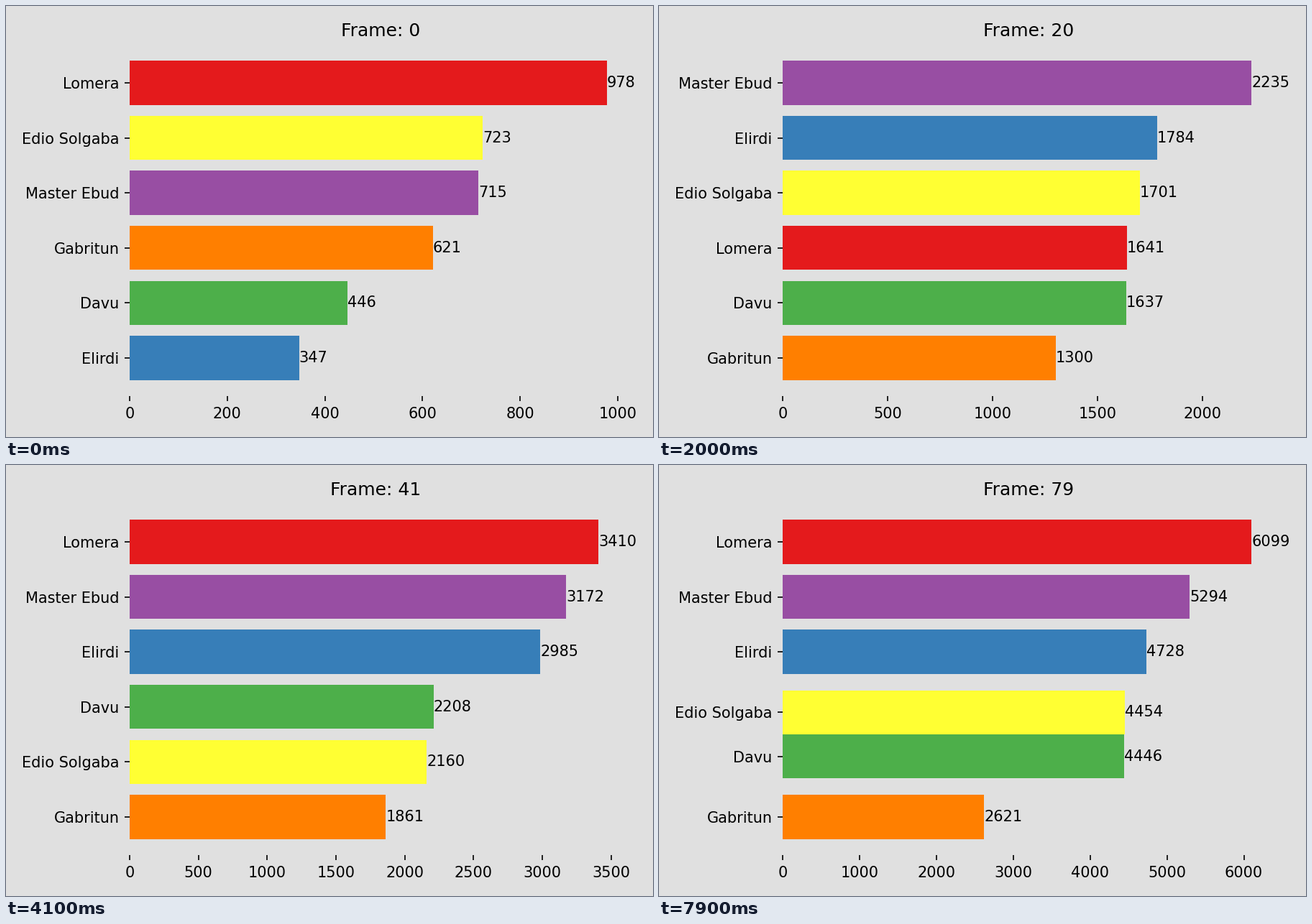
Animation, 900 px wide and 600 px high, one loop 8000 ms. Source, as a matplotlib script:

```python
import matplotlib.pyplot as plt
import numpy as np
from matplotlib.animation import FuncAnimation

FRAMES = 80
KEY_FRAMES = [0, 10, 20, 40, 80]
RANK_FRAMES = range(0, FRAMES + 1, 10)

# Score of each fighter at the key frames; growth is steady in between.
FIGHTERS = {
    "Lomera": [978, 1375, 1641, 3340, 6170],
    "Elirdi": [347, 954, 1784, 2940, 4774],
    "Davu": [446, 1118, 1637, 2150, 4505],
    "Master Ebud": [715, 1659, 2235, 3117, 5350],
    "Gabritun": [621, 656, 1300, 1842, 2641],
    "Edio Solgaba": [723, 988, 1701, 2100, 4515],
}
COLORS = plt.cm.Set1(range(len(FIGHTERS)))

fig, ax = plt.subplots(figsize=(6, 4), dpi=150, facecolor=".88")


def scores(frame):
    return np.array([np.interp(frame, KEY_FRAMES, keys)
                     for keys in FIGHTERS.values()])


# Order is taken every ten frames, and bars glide from one place to the next.
PLACES = np.array([scores(f).argsort().argsort() + 1 for f in RANK_FRAMES])


def places(frame):
    return np.array([np.interp(frame, RANK_FRAMES, p) for p in PLACES.T])


def update(frame):
    values, ranks = scores(frame), places(frame)
    ax.clear()
    ax.set_facecolor(".88")
    ax.spines[:].set_visible(False)
    ax.barh(ranks, values, height=0.8, color=COLORS)
    ax.set_yticks(ranks, FIGHTERS)
    ax.set_title(f"Frame: {frame}")
    for value, rank in zip(values, ranks):
        ax.text(value, rank, int(value + 1e-6), ha="left", va="center")
    # Label overhang depends on the axes width, so settle the layout twice.
    for _ in range(2):
        fig.tight_layout()
        fig.subplots_adjust(left=172 / 900)


anim = FuncAnimation(fig, update, frames=FRAMES, interval=100,
                     repeat=True, repeat_delay=0)
plt.show()
```
